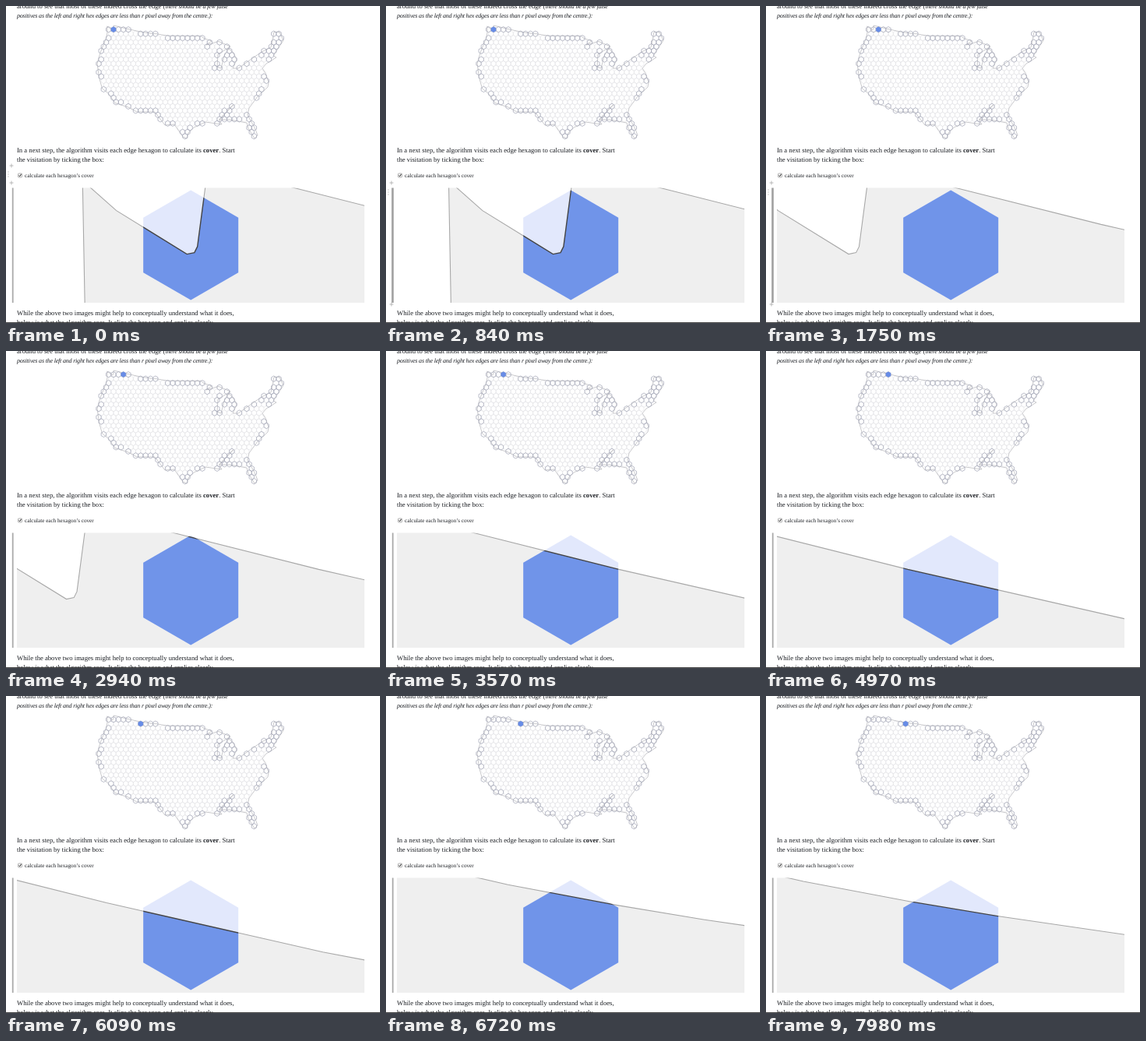
An HTML page for the animation above (8 s loop, 480 by 407 pixels).

```html
<!DOCTYPE html>
<html lang="en">
<head>
<meta charset="utf-8">
<title>Hexagon cover</title>
<style>
  html, body { margin: 0; width: 100%; height: 100%; overflow: hidden; background: #fff; }
  svg { display: block; width: 480px; height: 407px; }
  text { font: 8.63px "Liberation Serif", serif; fill: #1b1e23; text-rendering: geometricPrecision; white-space: pre; }
  .it { font-size: 8px; font-style: italic; letter-spacing: -.19px; }
  .label { font-size: 7.15px; }
  path { vector-effect: non-scaling-stroke; }
  .grid { fill: none; stroke: #e3e3e6; stroke-width: .6; }
  .edge { fill: none; stroke: #a6a9b8; stroke-width: .75; }
  .coast { fill: none; stroke: #b4b4b8; stroke-width: .7; }
  .land { fill: #efefef; stroke: #a8a8a8; stroke-width: 1.1; }
  .cover { fill: #7094e9; stroke: #444; stroke-width: 1.4; }
  .mark { fill: none; stroke: #aaa; stroke-width: .8; }
  .dots { stroke: #999; stroke-width: 1; stroke-dasharray: 1 2; }
</style>
</head>
<body>
<svg viewBox="0 0 480 407">
  <defs>
    <clipPath id="view"><rect x="14" y="233.5" width="446" height="147.5"/></clipPath>
    <clipPath id="cell"><path id="cellPath"/></clipPath>
  </defs>

  <text x="14" y="3">around to see that most of these indeed cross the edge (<tspan class="it">there should be a few false</tspan></text>
  <text x="14" y="14.5" class="it">positives as the left and right hex edges are less than r pixel away from the centre.):</text>

  <path id="grid" class="grid"/>
  <path id="coast" class="coast"/>
  <path id="edge" class="edge"/>
  <path id="spot" fill="#678ce6"/>

  <text x="14" y="188">In a next step, the algorithm visits each edge hexagon to calculate its <tspan font-weight="bold">cover</tspan>. Start</text>
  <text x="14" y="200">the visitation by ticking the box:</text>

  <rect x="15.5" y="215" width="5" height="5" rx=".8" fill="#f4f4f4" stroke="#999" stroke-width=".7"/>
  <path d="M16.5 217.6l1.1 1.2 2-3" fill="none" stroke="#222"/>
  <text x="24" y="219.8" class="label">calculate each hexagon’s cover</text>

  <g id="hoverBox" class="mark">
    <path d="M4.5 205h5M7 202.5v5M4.5 227h5M7 224.5v5"/>
    <path class="dots" d="M3 212.5v7"/>
  </g>
  <g id="hoverView" class="mark">
    <path d="M4.5 227h5M7 224.5v5M4.5 383h5M7 380.5v5"/>
    <path class="dots" d="M3 235.5v7"/>
  </g>
  <rect id="bar" y="233.5" height="147.5"/>

  <g clip-path="url(#view)"><path id="land" class="land"/></g>
  <path id="cellBack" fill="#e2e8fc"/>
  <g clip-path="url(#cell)"><path id="cover" class="cover"/></g>

  <text x="14" y="397">While the above two images might help to conceptually understand what it does,</text>
  <text x="14" y="408.5">below is what the algorithm sees. It clips the hexagon and applies clearly</text>
  <rect y="406" width="480" height="1" fill="#444"/>
</svg>
<script>
const $ = id => document.getElementById(id);

// Outline in map pixels, clockwise from the north-west corner
const outline = `129.85 25.9 132.1 27.9 136.8 30.8 137.3 30.7 137.5 30.3 138.2 25 144 26.4 153.6 28.82
  168 32.1 175.2 33.46 181.1 34.44 189.5 35.66 193 35.66 201 37.2 209 38.2 251 38.6
  253 41 264 45 257 50 273 45.5 288 52 272 62 271 78 276 80 280 64 286 55 292 60 296 69 291 80 298 80
  315 68 328 59 340 53 344 33.5 351 33.5 356 44 343 64 347 66 334 74 329 80 333 86 337 98 336 104
  323 116 312 131 310 140 319 156 323 166 319 170 311 157 309 150 287 146
  274 146 291.5 127 273.5 146 277 152 256 149 241 156 234 163 232 170 227 168 216 152 204 153
  191 136 168 136 157 130 140 124.5 131 112 123.5 106 119.5 92 117 74 121 60 129 40 130 34`
  .trim().split(/\s+/).map(Number).reduce((pts, v, i, a) => i % 2 ? [...pts, [a[i - 1], v]] : pts, []);

const pitch = 6.33, R = pitch / Math.sqrt(3), zoom = 122 / pitch;
const center = (col, row) => [138 + col * pitch, 30.2 + row * 1.5 * R];
const toPath = pts => 'M' + pts.map(p => p.map(v => +v.toFixed(2)).join(' ')).join('L') + 'Z';

function hex([x, y], r) {
  return toPath([0, 1, 2, 3, 4, 5].map(k => {
    const a = Math.PI * (k / 3 + 1 / 6);
    return [x + r * Math.cos(a), y + r * Math.sin(a)];
  }));
}

const sides = outline.map((p, i) => [p, outline[(i + 1) % outline.length]]);

const inside = ([x, y]) => sides.reduce((odd, [a, b]) =>
  (a[1] > y) !== (b[1] > y) && x < a[0] + (b[0] - a[0]) * (y - a[1]) / (b[1] - a[1]) ? !odd : odd, false);

const distance = ([x, y]) => Math.min(...sides.map(([a, b]) => {
  const dx = b[0] - a[0], dy = b[1] - a[1];
  const u = Math.max(0, Math.min(1, ((x - a[0]) * dx + (y - a[1]) * dy) / (dx * dx + dy * dy)));
  return Math.hypot(x - a[0] - u * dx, y - a[1] - u * dy);
}));

let inner = '', edge = '';
for (let row = -1; row < 27; row++) {
  for (let k = -4; k < 36; k++) {
    const c = center(k + (row & 1) / 2, row);
    if (!inside(c)) continue;
    if (distance(c) < R) edge += hex(c, R);
    else inner += hex(c, R);
  }
}

const shape = toPath(outline);
const cell = hex([237.2, 307], R * zoom);
const set = (id, d) => $(id).setAttribute('d', d);
set('grid', inner);
set('edge', edge);
for (const id of ['coast', 'land', 'cover']) set(id, shape);
for (const id of ['cellPath', 'cellBack']) set(id, cell);

// Visits: start time, column, row
const visits = [[-2000, -1, 0], [-390, 0, 0], [1306, 1, 0], [2915, 2, 0],
                [4460, 3, 0], [6060, 5.5, 1], [7660, 6.5, 1]];
const LOOP = 8000, EASE = 205;

function draw() {
  const t = performance.now() % LOOP;
  let i = visits.length - 1;
  while (visits[i][0] > t) i--;
  const [start, col, row] = visits[i], from = visits[i - 1];
  const left = Math.exp((start - t) / EASE);
  const [x, y] = center(col + (from[1] - col) * left, row + (from[2] - row) * left);
  const move = `translate(${237.2 - x * zoom} ${307 - y * zoom}) scale(${zoom})`;
  $('land').setAttribute('transform', move);
  $('cover').setAttribute('transform', move);
  set('spot', hex(center(col, row), R));

  const onView = t >= 280 && t < 2170;
  $('hoverBox').style.display = t < 280 ? '' : 'none';
  $('hoverView').style.display = onView ? '' : 'none';
  $('bar').setAttribute('x', onView ? 7.2 : 7.8);
  $('bar').setAttribute('width', onView ? 2.6 : 1.8);
  $('bar').setAttribute('fill', onView ? '#a0a0a0' : '#aaa');
  requestAnimationFrame(draw);
}
draw();
</script>
</body>
</html>
```
